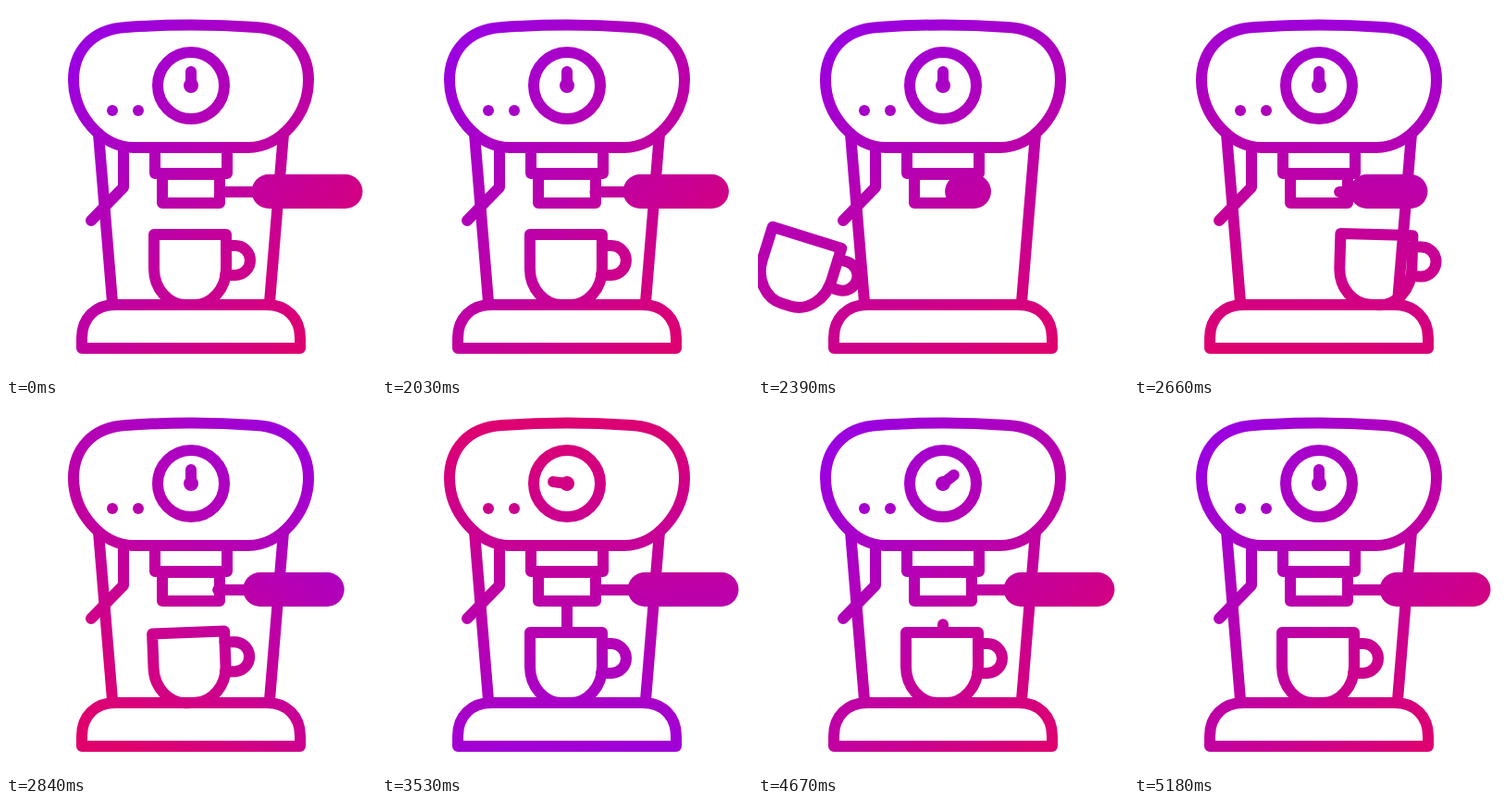
These frames come from a looping animation (400x400 px, 5.21 s). An HTML page:

```html
<!DOCTYPE html>
<html lang="en">
<head>
<meta charset="utf-8">
<title>Espresso machine</title>
<style>
  html, body { margin: 0; width: 100%; height: 100%; overflow: hidden; background: #fff; }
  svg { display: block; width: 400px; height: 400px; }
  .lines { fill: none; stroke: #fff; stroke-width: 12; stroke-linecap: round; stroke-linejoin: round; }
  .solid { fill: #fff; stroke: none; }

  .tint, .grip, .cup, .needle, .stream { animation: 5210ms linear infinite; }
  .tint { transform-origin: 225px 200px; animation-name: tint; }
  .grip { transform-origin: 209px 200px; animation-name: twist; }
  .grip path { vector-effect: non-scaling-stroke; }
  .cup { transform-origin: 199px 323px; animation-name: swap; }
  .needle { transform-origin: 200px 86px; animation-name: gauge; }
  .stream { stroke-dasharray: 34 80; animation-name: pour; }

  /* one full turn of the gradient */
  @keyframes tint {
    0% { transform: rotate(45deg); }
    38.39% { transform: rotate(45deg); animation-timing-function: cubic-bezier(.37, 0, .63, 1); }
    89.64%, 100% { transform: rotate(405deg); }
  }
  /* the handle turns towards the viewer and back */
  @keyframes twist {
    0%, 38.39% { transform: scaleX(1); }
    45.87% { transform: scaleX(.157); animation-timing-function: ease-out; }
    48.18% { transform: scaleX(.03); animation-timing-function: cubic-bezier(.215, .61, .355, 1); }
    61.04%, 100% { transform: scaleX(1); }
  }
  /* the old cup leaves to the left, a new one arrives from the right */
  @keyframes swap {
    0% { transform: translateX(0) rotate(0deg); }
    38.39% { transform: translateX(0) rotate(0deg); animation-timing-function: cubic-bezier(.32, 0, .67, 0); }
    47.6% { transform: translateX(-312px) rotate(32deg); animation-timing-function: step-end; }
    47.61% { transform: translateX(300px) rotate(17deg); }
    48.75% { transform: translateX(300px) rotate(17deg); animation-timing-function: cubic-bezier(.215, .61, .355, 1); }
    54.51% { transform: translateX(1px) rotate(-2.2deg); animation-timing-function: ease-in-out; }
    61.04%, 100% { transform: translateX(0) rotate(0deg); }
  }
  @keyframes gauge {
    0% { transform: rotate(0deg); }
    58.54% { transform: rotate(0deg); animation-timing-function: ease-in-out; }
    70.06% { transform: rotate(-90deg); animation-timing-function: ease-in-out; }
    82.53% { transform: rotate(85deg); animation-timing-function: ease-in-out; }
    98.85%, 100% { transform: rotate(0deg); }
  }
  @keyframes pour {
    0%, 61.42% { stroke-dashoffset: 36; }
    66.8%, 80.61% { stroke-dashoffset: 0; }
    93.47%, 100% { stroke-dashoffset: -36; }
  }
</style>
</head>
<body>
<svg viewBox="0 0 400 400">
  <defs>
    <linearGradient id="hue" gradientUnits="userSpaceOnUse" x1="25" y1="0" x2="425" y2="0">
      <stop offset="0" stop-color="#9c00de"/>
      <stop offset="1" stop-color="#e0006c"/>
    </linearGradient>
    <mask id="machine" maskUnits="userSpaceOnUse" x="0" y="0" width="400" height="400">
      <g class="lines">
        <!-- body -->
        <path d="M130 23Q200 18 270 23C308 25 327 50 327 80C327 118 296 153 262 153H138C104 153 73 118 73 80C73 50 92 25 130 23Z"/>
        <path d="M100 138L115 320M300 138L285 320"/>
        <path d="M82 370V359C82 337 97 323 118 323H282C303 323 318 337 318 359V370Z"/>
        <path d="M127 153V196L92 232"/>
        <g class="solid"><circle cx="115" cy="113" r="6"/><circle cx="143" cy="113" r="6"/></g>
        <!-- dial -->
        <circle cx="200" cy="86" r="36"/>
        <g class="needle">
          <circle class="solid" cx="200" cy="86" r="8"/>
          <path d="M200 86V71"/>
        </g>
        <!-- brew head -->
        <path d="M161 153V181H239V153"/>
        <path d="M169 182H231V213H169Z"/>
        <g class="grip">
          <path d="M232 201H284"/>
          <path d="M284 200.5H367" stroke-width="37"/>
        </g>
        <path class="stream" d="M200 213V247"/>
        <g class="cup">
          <path d="M160 247H238V284C238 306 222 323 204 323H194C176 323 160 306 160 284Z"/>
          <path d="M238 259H248A16 16 0 0 1 248 291H237"/>
        </g>
      </g>
    </mask>
  </defs>
  <g mask="url(#machine)">
    <rect class="tint" x="-200" y="-200" width="850" height="800" fill="url(#hue)"/>
  </g>
</svg>
</body>
</html>
```
